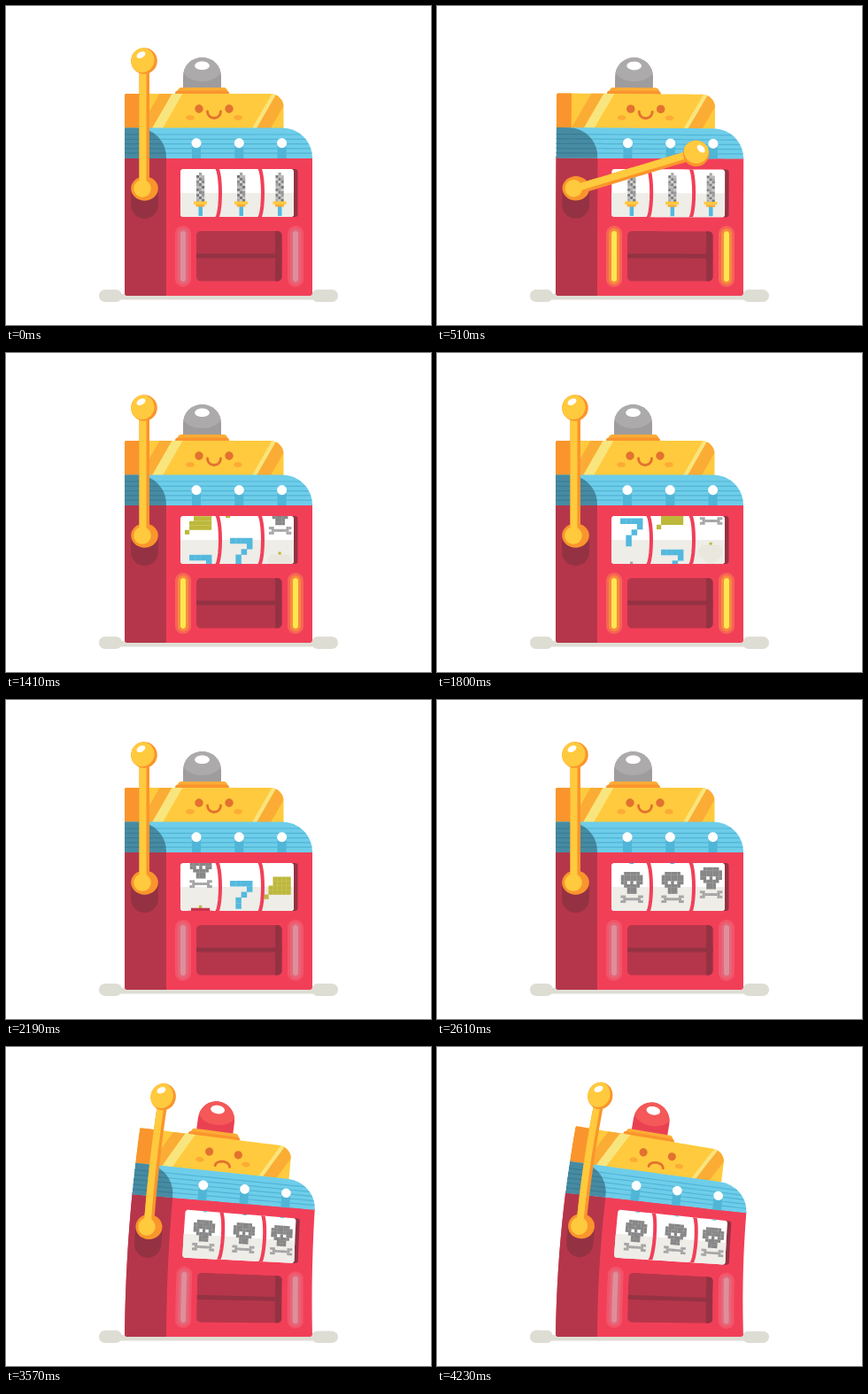
An HTML page with a canvas for the animation above (4500 ms loop, 480 px wide and 360 px high).

```html
<!DOCTYPE html>
<html lang="en">
<head>
<meta charset="utf-8">
<title>Slot machine</title>
<style>
  html, body { margin: 0; width: 100%; height: 100%; overflow: hidden; background: #fff; }
  canvas { display: block; width: 480px; height: 360px; }
</style>
</head>
<body>
<canvas id="stage" width="480" height="360"></canvas>
<script>
const ctx = document.getElementById('stage').getContext('2d');
const LOOP = 4500;
const C = {
  red: '#f23f58', wine: '#b5364a', deep: '#943243', sky: '#6ecde9', teal: '#478ba2',
  line: '#50b5d6', gold: '#ffca3d', amber: '#fbac35', orange: '#fa952d', pale: '#f9e57d',
  face: '#e2722f', ground: '#deddd4', olive: '#bdb83a', blue: '#54b9dd', bone: '#878787'
};

const clamp = u => Math.max(0, Math.min(1, u));
const smooth = u => u * u * (3 - 2 * u);
const ramp = (t, from, to) => smooth(clamp((t - from) / (to - from)));

// Bend and squeeze grow with height above the floor; the lever also turns on its pivot.
const AXIS = 204, FLOOR = 326, BEND = 0.00072, SQUEEZE = 0.0002, PIVOT = [154, 206];
let bend = 0, turn = 0;

function place([x, y]) {
  if (turn) {
    const dx = x - PIVOT[0], dy = y - PIVOT[1], c = Math.cos(turn), s = Math.sin(turn);
    x = PIVOT[0] + dx * c - dy * s;
    y = PIVOT[1] + dx * s + dy * c;
  }
  const h = FLOOR - y;
  if (h <= 0 || Math.abs(bend) < 1e-4) return [x, y];
  const k = bend * BEND, a = k * h, d = (x - AXIS) * (1 - bend * SQUEEZE * h);
  return [AXIS + (1 - Math.cos(a)) / k + d * Math.cos(a),
          FLOOR - Math.sin(a) / k + d * Math.sin(a)];
}

function trace(pts, closed = true) {
  ctx.beginPath();
  ctx.moveTo(...place(pts[0]));
  const last = closed ? pts.length : pts.length - 1;
  for (let i = 0; i < last; i++) {
    const [ax, ay] = pts[i], [bx, by] = pts[(i + 1) % pts.length];
    const n = Math.ceil(Math.hypot(bx - ax, by - ay) / 10) || 1;
    for (let j = 1; j <= n; j++) ctx.lineTo(...place([ax + (bx - ax) * j / n, ay + (by - ay) * j / n]));
  }
  if (closed) ctx.closePath();
}

function fill(pts, color) {
  trace(pts);
  ctx.fillStyle = color;
  ctx.fill();
}

function stroke(pts, color, width) {
  trace(pts, false);
  ctx.strokeStyle = color;
  ctx.lineWidth = width;
  ctx.stroke();
}

function within(pts, paint) {
  ctx.save();
  trace(pts);
  ctx.clip();
  paint();
  ctx.restore();
}

function arc(cx, cy, rx, ry, from, to, n = 12) {
  return Array.from({ length: n + 1 }, (_, i) => {
    const a = (from + (to - from) * i / n) * Math.PI / 180;
    return [cx + rx * Math.cos(a), cy + ry * Math.sin(a)];
  });
}

// Corner radii: top left, top right, bottom right, bottom left.
function box(x, y, w, h, a = 0, b = a, c = a, d = a) {
  const corner = (cx, cy, r, from) => r ? arc(cx, cy, r, r, from, from + 90, 8) : [[cx, cy]];
  return [
    ...corner(x + a, y + a, a, 180), ...corner(x + w - b, y + b, b, 270),
    ...corner(x + w - c, y + h - c, c, 0), ...corner(x + d, y + h - d, d, 90)
  ];
}

const oval = (x, y, rx, ry = rx) => arc(x, y, rx, ry, 0, 360, 36);

// Pixel art on a grid: columns -5..5, rows 0..rows-1, rule(col, row) gives a colour or nothing.
function pixels(x, y, cell, rows, rule) {
  for (let r = 0; r < rows; r++) {
    for (let c = -5; c <= 5; c++) {
      const color = rule(c, r);
      if (color) fill(box(x + (c - 0.5) * cell, y + r * cell, cell + 0.2, cell + 0.2), color);
    }
  }
}

function sword(x, y) {
  pixels(x, y - 24, 3, 11, (c, r) => {
    const tone = 165 + Math.round(45 * Math.sin(r * 2.6 + c * 4.1));
    return Math.abs(c) <= Math.min(r, 1) && `rgb(${tone},${tone},${tone})`;
  });
  fill(box(x - 2, y + 13, 4.5, 12), C.blue);
  fill(box(x - 7.5, y + 8.5, 15, 3.5), C.gold);
  fill(box(x - 5, y + 12, 10, 2.5), C.amber);
}

function skull(x, y) {
  pixels(x + 0.5, y - 18, 3.5, 7, (c, r) => {
    const eye = r === 3 && Math.abs(c) === 1;
    const half = r < 1 ? 2 : r < 4 ? 3 : r < 5 ? 2 : 1;
    return Math.abs(c) <= half && (eye ? '#fff' : C.bone);
  });
  pixels(x + 0.5, y + 8.5, 2.8, 3, (c, r) =>
    (r === 1 ? Math.abs(c) < 4 : Math.abs(c) === 3 || Math.abs(c) === 4) && '#a6a6a6');
}

function berry(x, y, tones) {
  pixels(x, y - 15, 3, 8, (c, r) => r === 0
    ? c === 0 && C.olive
    : Math.abs(c) <= Math.min(2 + r, 4, 8 - r) && tones[r < 4 ? 0 : 1]);
}

function banana(x, y) {
  pixels(x, y - 17, 5, 5, (c, r) => (r === 4 ? c === -3 : c < 3 && c >= -1 - (r >> 1)) && C.olive);
}

function seven(x, y) {
  pixels(x - 3, y - 21, 6.3, 5, (c, r) =>
    (r === 0 ? c >= -1 && c <= 2 : c === Math.max(0, 3 - r)) && C.blue);
}

const STRIP = [sword, skull, berry, banana, seven];
const PITCH = 52, LAP = PITCH * STRIP.length;
const START = 560, CRUISE = 1050, BRAKE = 1800;
const RED = ['#c7344b', '#e83d54'], PALE = ['#e9e7dc', '#e9e7dc'];

// Travel at the start and end of the even run; the laps are full turns before the skull.
const REELS = [
  { x: 219.5, from: 146, to: 567, laps: 2, tones: RED },
  { x: 265.5, from: 77, to: 602, laps: 3, tones: RED },
  { x: 309, from: 213, to: 692, laps: 3, tones: PALE }
];

// Power curves on both sides meet the even run at its own speed.
function travel({ from, to, laps }, index, t) {
  const speed = (to - from) / (BRAKE - CRUISE), end = (laps + 1) * LAP - PITCH;
  const rise = CRUISE - START, fall = 590 + 175 * index;
  if (t < CRUISE) return from * Math.pow(clamp((t - START) / rise), speed * rise / from);
  if (t < BRAKE) return from + speed * (t - CRUISE);
  return end - (end - to) * Math.pow(1 - clamp((t - BRAKE) / fall), speed * fall / (end - to));
}

function drawReels(t) {
  fill(box(322, 184, 7.5, 54, 0, 3, 3, 0), C.deep);
  within(box(197, 184, 128, 54, 3), () => {
    fill(box(196, 183, 130, 56), '#fff');
    fill(box(196, 211, 130, 28), '#eeede8');
    REELS.forEach((reel, n) => STRIP.forEach((symbol, i) => {
      const y = (travel(reel, n, t) + i * PITCH + 100) % LAP - 100;
      if (Math.abs(y) < 60) symbol(reel.x, 212 + y, reel.tones);
    }));
    for (const x of [237, 285]) stroke(arc(x, 211, 5, 29, -90, 90), C.red, 4);
  });
}

function drawLamp(x, on) {
  const tones = on ? ['#f66555', '#f78b3e', '#ffe64f'] : ['#f35469', '#e4677a', '#df8e9b'];
  tones.forEach((tone, i) => {
    const r = 9 - 3 * i;
    fill(box(x - r, 248 + 3 * i, 2 * r, 69 - 6 * i, r), tone);
  });
}

function drawBody(t) {
  fill(box(134, 170, 212, 157, 0, 0, 3, 3), C.red);
  fill(box(134, 170, 47, 157, 0, 0, 0, 3), C.wine);
  within(box(215, 254, 96.5, 56.5, 5), () => {
    fill(box(215, 254, 97, 57), C.wine);
    fill(box(304, 254, 8, 57), C.deep);
    fill(box(215, 279.5, 97, 5), C.deep);
  });
  const on = t < 2520 && Math.floor(t / 360) % 2 === 1;
  drawLamp(200, on);
  drawLamp(327, on);
  drawReels(t);
}

function drawAwning() {
  const panel = (w, r, color, stripe) => within(box(134, 137.5, w, 34.5, 0, r, 0, 0), () => {
    fill(box(134, 137, w, 35), color);
    for (let y = 145; y < 170; y += 5.3) stroke([[134, y], [134 + w, y]], stripe, 1.2);
  });
  panel(212, 34, C.sky, C.line);
  panel(47, 33, C.teal, '#397c94');
  for (let x = 215; x < 320; x += 48.3) {
    fill(box(x - 5, 155, 10, 17), C.line);
    fill(oval(x, 154.7, 5.5), '#fff');
  }
}

function drawFace(t) {
  const open = 1 - ramp(t, 960, 1020) + ramp(t, 1080, 1140);
  const sad = ramp(t, 3120, 3420);
  for (const side of [-1, 1]) {
    fill(oval(235 + side * 17, 116, 4.7, 1.2 + 3.5 * open), C.face);
    fill(oval(235 + side * 27, 126, 4.8, 2.8), C.amber);
  }
  stroke(arc(235, 119 + 12 * sad, 7.5 + sad, 7.5 - 13 * sad, 180, 0), C.face, 2.8);
}

function drawBulb(t) {
  const lit = t > 3330;
  within(box(200, 58, 43, 36, 21.5, 21.5, 0, 0), () => {
    fill(box(199, 57, 45, 38), lit ? '#ea4152' : '#9e9c9d');
    fill(oval(221.5, 71, 22, 14), lit ? '#f45858' : '#acaaaa');
  });
  fill(oval(221.5, 67.3, 8.3, 4.8), '#fff');
  fill(box(194, 92, 56, 7, 4, 4, 0, 0), C.amber);
  fill(box(191, 95.5, 61, 4, 3, 3, 0, 0), C.orange);
}

function drawHat(t) {
  const beam = (x, w, color) => fill([[x + 20, 98], [x + w + 20, 98], [x + w - 3, 138], [x - 3, 138]], color);
  drawBulb(t);
  within(box(134, 99, 179.5, 39, 2, 15, 0, 0), () => {
    fill(box(134, 98, 180, 41), C.gold);
    beam(154, 17, C.amber);
    beam(168, 12, C.pale);
    beam(284, 18, C.amber);
    beam(281, 5, C.pale);
    fill(box(134, 98, 17, 41), C.orange);
  });
  drawFace(t);
}

function drawLever(t) {
  fill(box(141, 206, 31, 34, 0, 0, 15.5, 15.5), C.deep);
  fill(oval(156.5, 206, 15.3, 13.7), C.orange);
  turn = 79 * (ramp(t, 120, 590) - ramp(t, 590, 960)) * Math.PI / 180;
  fill(box(150.5, 70, 11.5, 132), C.orange);
  fill(box(150.5, 70, 8, 132), C.gold);
  fill(oval(...PIVOT, 9.7), C.gold);
  within(oval(156, 62, 14.8), () => {
    fill(box(140, 46, 32, 32), C.orange);
    fill(oval(153.5, 61, 14), C.gold);
  });
  const c = Math.cos(0.5), s = Math.sin(0.5);
  fill(oval(0, 0, 5.3, 3.3).map(([x, y]) => [152.5 + x * c + y * s, 55.2 - x * s + y * c]), '#fff');
  turn = 0;
}

function drawGround() {
  fill(box(105, 320, 26, 14, 7), C.ground);
  fill(box(345, 320, 30, 14, 7), C.ground);
  fill(box(128, 325, 222, 6.5), C.ground);
}

// A slight sway while the lever is pulled, then a dip to the left and a slump to the right.
function lean(t) {
  const sway = ramp(t, 250, 700) - ramp(t, 1060, 1300);
  const slump = smooth(1 - Math.pow(1 - clamp((t - 3010) / 980), 1.4));
  return 0.08 * sway - 0.05 * ramp(t, 2780, 3010) + 1.05 * slump;
}

function draw(t) {
  ctx.clearRect(0, 0, 480, 360);
  bend = lean(t);
  drawGround();
  drawBody(t);
  drawHat(t);
  drawAwning();
  drawLever(t);
}

ctx.lineCap = 'round';
const began = performance.now();
function tick() {
  draw((performance.now() - began) % LOOP);
  requestAnimationFrame(tick);
}
tick();
</script>
</body>
</html>
```
